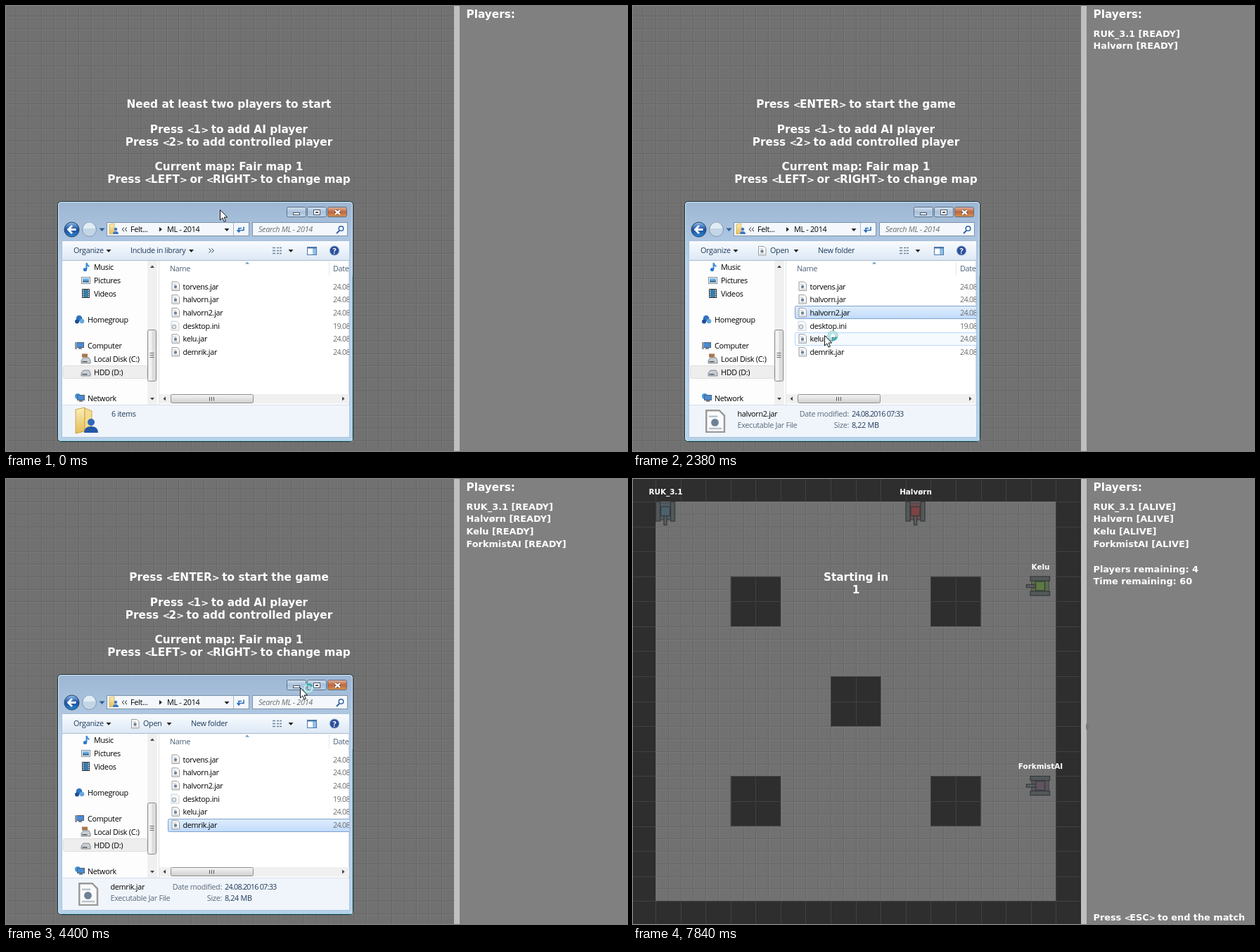
An HTML page for the animation above (8000 ms loop, 883 by 634 pixels).

```html
<!DOCTYPE html>
<html lang="en">
<head>
<meta charset="utf-8">
<title>Tank lobby</title>
<style>
html, body { margin: 0; width: 100%; height: 100%; overflow: hidden; background: #717171; }
svg { display: block; }
.game { font: bold 15.3px "DejaVu Sans", sans-serif; fill: #fff; }
.game .sub { font-size: 12.85px; }
.game .tag { font-size: 10.4px; text-anchor: middle; }
.game .key { font-size: .85em; letter-spacing: -.14em; }
.mid { text-anchor: middle; }
.ui { font: 10.8px "Open Sans", "Noto Sans", sans-serif; letter-spacing: -.3px; fill: #000; }
.ui .num { letter-spacing: -.75px; }
text { white-space: pre; }
</style>
</head>
<body>
<svg width="883" height="634" viewBox="0 0 883 634">
  <defs>
    <clipPath id="list"><path d="M218 363h270v205h-270z"/></clipPath>
    <clipPath id="nav"><path d="M80 363h137v205h-137z"/></clipPath>
  </defs>
  <g id="floor"></g>
  <g id="arena"></g>
  <path fill="#808080" d="M645 0h238v634h-238z"/>
  <path fill="#bfbfbf" d="M637 0h8v634h-8z"/>
  <ellipse id="smudge" cx="646" cy="353" rx="2" ry="5" fill="#777"/>
  <g id="hud" class="game"></g>
  <g id="win" class="ui"></g>
  <g id="cursor">
    <path fill="#fff" stroke="#111" stroke-width="1" d="M.5.5v14.5l3.3-3.2 2.3 5.4 2.3-1-2.3-5.2h4.6z"/>
    <g id="ring" fill="none">
      <circle r="5.5" stroke="#8fd0d2" stroke-width="4"/>
      <circle r="5.5" stroke="#d9f3f3" stroke-width="1.4"/>
      <path stroke="#3aa6a8" stroke-width="2.6" d="M0-5.5a5.5 5.5 0 0 1 5.5 5.5"/>
    </g>
  </g>
</svg>
<script>
const LOOP = 8000, TILE = 17.79, CELL = 2 * TILE, EDGE = 32, ROW = 18.7;
const $ = id => document.getElementById(id);

// ---------- data ----------
const bots = [
  { name: 'RUK_3.1', join: 1180, x: 46, y: 46, turn: 0, color: '#4b626c' },
  { name: 'Halvørn', join: 2010, x: 401.5, y: 46, turn: 0, color: '#7e4343' },
  { name: 'Kelu', join: 2850, x: 579, y: 152.5, turn: 90, color: '#5d7a42' },
  { name: 'ForkmistAI', join: 3640, x: 579, y: 437, turn: 90, color: '#5f5361' }
];
const files = ['torvens.jar', 'halvorn.jar', 'halvorn2.jar', 'desktop.ini', 'kelu.jar', 'demrik.jar'];
const sizes = ['8,22', '8,22', '8,22', '', '8,23', '8,24'];
const picks = [[950, 0], [1830, 2], [2620, 4], [3370, 5]];
// start, end, steps, x, y
const moves = [
  [220, 760, 12, 276, 394], [1320, 1590, 7, 275, 458], [1730, 1730, 1, 276, 443],
  [2190, 2380, 5, 272, 469], [2990, 3110, 3, 276, 531], [3150, 3230, 3, 280, 491],
  [3690, 4170, 11, 418, 297], [4690, 4820, 3, 647, 355], [5010, 5010, 1, 647, 352],
  [5210, 5210, 1, 777, 416]
];

// ---------- helpers ----------
const rect = (x, y, w, h, fill, more = '') =>
  `<rect x="${x}" y="${y}" width="${w}" height="${h}" fill="${fill}" ${more}/>`;
const path = (d, fill, more = '') => `<path d="${d}" fill="${fill}" ${more}/>`;
const dot = (x, y, r, fill, more = '') => `<circle cx="${x}" cy="${y}" r="${r}" fill="${fill}" ${more}/>`;
const text = (x, y, s, more = '') => `<text x="${x}" y="${y}" ${more}>${s}</text>`;
const line = (d, color, w = 1, more = '') => path(d, 'none', `stroke="${color}" stroke-width="${w}" ${more}`);
const frame = (x, y, w, h, fill, stroke, r = 0) =>
  rect(x + .5, y + .5, w - 1, h - 1, fill, `stroke="${stroke}" rx="${r}"`);
const down = (x, y, c = '#222', r = 3.5) => path(`M${x - r} ${y - 2}h${2 * r}l${-r} ${r + .5}z`, c);
const fade = (id, ...stops) => `<linearGradient id="${id}" x2="0" y2="1">` +
  stops.map((c, i) => `<stop offset="${i / (stops.length - 1)}" stop-color="${c}"/>`).join('') + '</linearGradient>';

// Key names sit in tight angle brackets.
const keys = s => s.replace(/[<>]/g, c => `<tspan class="key">${c === '<' ? '&lt;' : '&gt;'}</tspan>`);
const big = (y, s) => text(317, y, keys(s), 'class="mid"');
const side = (y, s) => text(654.5, y, keys(s), 'class="sub"');

const page = (x, y, k = 1) => `<g transform="translate(${x} ${y}) scale(${k})">` +
  path('M.5.5h7.5l3 3v9.5h-10.5z', '#fbfbfb', 'stroke="#9a9a9a"') +
  line('M2 4h5M2 11h7.5', '#b9c4cf') + dot(5.5, 7.5, 2.2, '#6d8196') + '</g>';

// ---------- arena ----------
// Whole-pixel grid lines in both directions, one tile or cell apart.
function mesh(first, step, shift) {
  let d = '';
  for (let p = first; p < 637; p += step) {
    const q = Math.round(p) + shift + .5;
    d += `M${q} 0v634M0 ${q}h637`;
  }
  return d;
}
$('floor').innerHTML = rect(0, 0, 637, 634, '#717171') +
  line(mesh(EDGE - TILE, TILE, 1), '#7a7a7a') + line(mesh(EDGE - TILE, TILE, 0), '#666');

function tank({ x, y, turn, color, name }) {
  const edge = 'stroke="#383b3d" stroke-width="1.3"';
  return `<g transform="translate(${x} ${y}) rotate(${turn})">` +
    rect(-8, -12, 16, 24, '#53585a', edge) + rect(-8, -12, 16, 24, color, 'opacity=".55"') +
    rect(-13.5, -13.5, 6, 27.5, '#53585a', edge) + rect(7.5, -13.5, 6, 27.5, '#53585a', edge) +
    rect(-6.5, -6.5, 13, 13, color, edge) + rect(-2, 6.5, 4, 13, '#5a5f60', edge) + '</g>' +
    text(x + .5, y - 24, name, 'class="tag"');
}
const blocks = [[3, 3], [11, 3], [7, 7], [3, 11], [11, 11]];
const far = EDGE + 16 * CELL;
$('arena').innerHTML =
  '<clipPath id="walls">' +
  path(`M0 0h637v634h-637zM${EDGE} ${EDGE}V${far}H${far}V${EDGE}z`, '#000', 'clip-rule="evenodd"') +
  blocks.map(([c, r]) => rect(EDGE + c * CELL, EDGE + r * CELL, 2 * CELL, 2 * CELL, '#000')).join('') +
  '</clipPath><g clip-path="url(#walls)">' + rect(0, 0, 637, 634, '#2e2e2e') +
  line(mesh(EDGE, CELL, 0), '#414141') + '</g>' +
  '<g class="game">' + bots.map(tank).join('') + '</g>';

// ---------- explorer window ----------
function chrome() {
  const button = (x, fill, id) => `<g id="${id}">` + frame(x, 286, 28, 15, fill, '#5b7188', 2) + '</g>';
  const refresh = 'M331 322v-5.5h4M328.5 319l2.5 3 2.5-3M338 314.500v5h-4M335.500 317';
  return '<defs>' + fade('glass', '#9db6d3', '#b7cfe8', '#b9d1ea', '#b9d1ea', '#b5d3ea') +
    fade('bar', '#f9fbfd', '#eaf2fa', '#dce7f5') + fade('btn', '#d3e0ee', '#a9c1da', '#bfd4e9') +
    fade('close', '#e3b29a', '#c0673f', '#d8924f') + fade('sel', '#dfedfd', '#c1dbfc') +
    fade('blue', '#8fc0ee', '#1a4fa0', '#2e86d0') + fade('thumb', '#f5f5f5', '#cfcfcf') +
    fade('folder', '#fbeeb6', '#e4bd58') + '</defs>' +
    rect(73.5, 278.5, 420, 342, 'url(#glass)', 'stroke="#16303a" rx="5"') +
    rect(74.5, 279.5, 418, 340, 'none', 'stroke="#dcecf8" rx="4"') +
    line('M76 619.500h416.500v-235', '#6fc3d0', 1, 'opacity=".7"') +
    button(399, 'url(#btn)', 'min') + button(428, 'url(#btn)', 'max') + button(457, 'url(#close)', 'quit') +
    frame(408, 294, 10, 4, '#fff', '#47566a') +
    frame(437, 290, 10, 8, '#fff', '#47566a') + rect(440, 293, 4, 2, '#47566a') +
    line('M468 291l7 6M475 291l-7 6', '#513530', 4) + line('M468 291l7 6M475 291l-7 6', '#fff', 2.4) +
    // navigation buttons
    dot(93.5, 318.5, 10.5, 'url(#blue)', 'stroke="#23405f"') +
    line('M99.500 318.500h-11M94 313l-5.500 5.500 5.500 5.500', '#fff', 2.8) +
    dot(118.5, 318.5, 10, '#c3d5e6', 'stroke="#7f97b0"') +
    path('M110 317a8.5 8.5 0 0 1 17 0z', '#e2ecf5') + down(136.5, 318.5, '#2b5f97', 4) +
    // address and search
    frame(143, 308, 203, 20, '#f4f8fc', '#7d93aa') + line('M323.5 309v18', '#a5b7c9') +
    `<g id="crumb">${frame(224, 309, 82, 18, 'url(#sel)', '#7fb0dc')}</g>` +
    path('M147 311l7-1v14l-7 1z', 'url(#folder)', 'stroke="#c39a3c" stroke-width=".6"') +
    dot(156, 318, 2.2, '#3b78c4') + path('M152 325a4 4 0 0 1 8 0z', '#3b78c4') +
    line('M168 315.5l-3 2.8 3 2.8M172 315.5l-3 2.8 3 2.8', '#222') +
    text(177, 322, 'Felt...') + path('M218 315l4 3.3-4 3.3z', '#222') + text(229, 322, 'ML - 2014') +
    down(314, 319) + line(refresh, '#2b6cb8', 1.6) +
    frame(350, 308, 136, 20, '#f4f8fc', '#7d93aa') +
    text(359, 322, 'Search ML - 2014', 'font-style="italic" fill="#6d6d6d"') +
    dot(476.5, 317, 3.3, 'none', 'stroke="#2f62a8" stroke-width="1.5"') + line('M474 320l-4 4', '#2f62a8', 2) +
    // toolbar
    rect(80, 335, 408, 279, '#fff', 'stroke="#a3b8cd"') + rect(80, 335, 408, 28, 'url(#bar)') +
    line('M80 362.5h408', '#a9bbcf') + '<g fill="#1e395b">' + text(96, 352, 'Organize') + down(146, 349) +
    '<g id="idle">' + text(177, 352, 'Include in library') + down(263.5, 349) +
    line('M288.5 345.5l3 3-3 3M292.5 345.5l3 3-3 3', '#1e395b') + '</g>' +
    '<g id="busy">' + page(178, 342) + text(195, 352, 'Open') + down(232, 349) + text(263, 352, 'New folder') + '</g></g>' +
    [344.5, 348.5, 352.5].map(y => line(`M379 ${y}h4M385 ${y}h3M389 ${y}h3`, '#6f8296', 1.6)).join('') +
    down(405, 349) + frame(428, 343, 14, 12, '#fff', '#4b78a8') + rect(436, 344, 5, 10, '#8fc0e6') +
    line('M428 344.5h14', '#4b78a8', 2) + dot(467, 348.5, 6.6, '#2a4f9c', 'stroke="#8ea6c6"') +
    text(467, 352.5, '?', 'class="mid" fill="#fff" font-weight="bold"');
}

function navPane() {
  const disk = (x, y) => path(`M${x} ${y + 4}l3-4h8l2 4v4h-13z`, '#c9ced3', 'stroke="#6d757c" stroke-width=".8"') +
    rect(x + 1.5, y + 5, 7, 1.5, '#555c63');
  const screen = (x, y) => frame(x, y, 11, 8, '#4a8bd6', '#54616f') + rect(x + 3, y + 8, 5, 2, '#7b8792');
  return '<g clip-path="url(#nav)">' + rect(80, 363, 137, 205, '#fdfdfe') +
    frame(81, 512, 120, 19, '#eeeeee', '#dedede', 2) +
    line('M114.5 375v-9q1 4 4 5', '#3a8bd8', 2) + dot(112.5, 375.5, 2.6, '#2e78c6') +
    frame(107, 386, 13, 10, '#fff', '#7e8a95') + rect(109, 388, 9, 3, '#6fb1e8') + rect(109, 391, 9, 3, '#4d7d9d') +
    frame(108, 403, 11, 13, '#3d7ba6', '#333') +
    line('M109.5 404v11M117.5 404v11', '#fff', 1, 'stroke-dasharray="1.5"') +
    dot(104, 445, 4.3, '#2f74c0') + dot(108, 449, 3.3, '#67a7dc') + dot(101, 449.5, 3, '#1f4e94') +
    screen(100, 479) + rect(98, 479, 3, 10, '#8b98a5') + rect(108, 495.5, 8, 5, '#a6774e') + disk(107, 501) + disk(107, 519) +
    dot(102, 556, 4, '#3f9be0') + screen(101, 554) +
    [['Music', 125, 376], ['Pictures', 125, 395], ['Videos', 125, 413.5], ['Homegroup', 116, 451], ['Computer', 116, 488],
     ['Local Disk (C:)', 125, 507], ['HDD (D:)', 125, 525.5], ['Network', 116, 563]]
      .map(([s, x, y]) => text(x, y, s)).join('') +
    rect(201, 363, 14, 205, '#f0f0f0') + path('M205 373l3-3.5 3 3.5z', '#444') + down(208, 560, '#444', 3) +
    frame(201, 461, 13, 74, '#dcdcdc', '#8d8d8d', 2) + rect(202.5, 462.5, 5, 71, '#f2f2f2') +
    line('M204.5 494.5h6M204.5 497.5h6M204.5 500.5h6', '#666') + '</g>' +
    line('M217.5 363v205', '#dfe5ec');
}

function fileList() {
  return '<g clip-path="url(#list)">' +
    text(233, 378, 'Name', 'fill="#4c607a"') + text(465, 378, 'Date', 'fill="#4c607a"') +
    path('M340 367.5l3-3 3 3z', '#5c9ac4') + line('M459.5 364v20', '#e0e8f0') +
    '<g id="rows"></g>' +
    files.map((f, i) => {
      const y = 399.5 + i * ROW;
      const icon = f.endsWith('ini')
        ? path(`M235 ${y - 6.5}h8l3 3v10h-11z`, '#f6f8fa', 'stroke="#c9d0d6"') + dot(239, y + 1.5, 2.6, 'none', 'stroke="#a7b4bf" stroke-width="1.6"')
        : page(235.5, y - 7);
      return icon + text(251.5, y + 4, f) +
        text(465, y + 4, (i === 3 ? '19' : '24') + '.08.2016 07:33', 'class="num" fill="#6d6d6d"');
    }).join('') +
    rect(218, 553, 270, 13.5, '#f0f0f0') + path('M227 556.5l-3.5 3 3.5 3z', '#444') + path('M478 556.5l3.5 3-3.5 3z', '#444') +
    frame(234, 553, 118, 13, 'url(#thumb)', '#8d8d8d', 2) +
    line('M289.5 557v5.5M292.5 557v5.5M295.5 557v5.5', '#555') + '</g>' +
    rect(80, 568, 408, 46, '#f0f5fb') + line('M80 568.5h408', '#d4dfec') + '<g id="details"></g>';
}
$('win').innerHTML = chrome() + navPane() + fileList();

const folderInfo =
  path('M99 575l13-3v34l-13 3z', 'url(#folder)', 'stroke="#cda64a"') +
  path('M112 573l10 4v30l-10-1z', '#f3dc91', 'stroke="#cda64a"') +
  dot(121, 593, 5, '#2e69bd') + path('M111 608q0-9 10-9t10 9z', '#2457a8') +
  text(150, 585, '6 items', 'fill="#1e395b"');
const fileInfo = i =>
  page(103, 575, 2.45) + text(148.5, 585, files[i]) +
  '<g fill="#5a6779">' + text(148.5, 601, 'Executable Jar File') +
  text(307, 585, 'Date modified:', 'text-anchor="end"') + text(307, 601, 'Size:', 'text-anchor="end"') + '</g>' +
  '<g fill="#1e395b">' + text(311, 585, '24.08.2016 07:33', 'class="num"') + text(311, 601, sizes[i] + ' MB') + '</g>';

// ---------- state by time ----------
function pointer(t) {
  let x = 304, y = 290;
  for (const [a, b, n, tx, ty] of moves) {
    if (t < a) break;
    const p = b > a ? Math.min(1, (Math.floor((t - a) / (b - a) * (n - 1) + 1e-6) + 1) / n) : 1;
    const e = p * p * (3 - 2 * p);
    x += (tx - x) * e;
    y += (ty - y) * e;
  }
  return [x, y];
}

function hud(t) {
  const play = t >= 5940;
  const joined = bots.filter(b => t >= b.join);
  let s = text(654.5, 17, 'Players:');
  joined.forEach((b, i) => s += side(43.5 + i * TILE, `${b.name} [${play ? 'ALIVE' : 'READY'}]`));
  if (play) {
    const count = t < 6820 ? 3 : t < 7840 ? 2 : 1;
    return s + side(132.5, 'Players remaining: 4') + side(150.3, 'Time remaining: 60') +
      side(628.5, 'Press <ESC> to end the match') + big(145, 'Starting in') + big(163, String(count));
  }
  return s + big(145, joined.length < 2 ? 'Need at least two players to start' : 'Press <ENTER> to start the game') +
    big(180.5, 'Press <1> to add AI player') + big(198.5, 'Press <2> to add controlled player') +
    big(234, 'Current map: Fair map 1') + big(251.5, 'Press <LEFT> or <RIGHT> to change map');
}

const last = {};
function put(id, html) {
  if (last[id] !== html) $(id).innerHTML = last[id] = html;
}
const show = (id, on) => $(id).setAttribute('visibility', on ? 'inherit' : 'hidden');

function draw(t) {
  const [x, y] = pointer(t);
  const pick = picks.filter(p => t >= p[0]).pop();
  const sel = pick ? pick[1] : -1;
  const over = x > 230 && x < 487 ? Math.floor((y - 390.2) / ROW) : -1;
  const row = (i, fill, edge) => frame(230, Math.round(390 + i * ROW), 262, 19, fill, edge, 2);

  show('arena', t >= 5940);
  show('smudge', t >= 5290);
  put('hud', hud(t));
  put('rows', (over >= 0 && over < files.length && over !== sel ? row(over, '#f5faff', '#b8d6fb') : '') +
    (sel >= 0 ? row(sel, 'url(#sel)', '#7da2ce') : ''));
  put('details', sel < 0 ? folderInfo : fileInfo(sel));
  show('idle', sel < 0);
  show('busy', sel >= 0);
  show('crumb', y > 308 && y < 328 && x > 144 && x < 345);
  $('min').setAttribute('opacity', t >= 4310 && t < 4400 ? .6 : 1);

  // Minimising: three short steps.
  const step = t < 4690 ? 0 : t < 4755 ? 1 : t < 4820 ? 2 : 3;
  const k = 1 - step * .06;
  show('win', step < 3);
  $('win').setAttribute('opacity', 1 - step * .36);
  $('win').setAttribute('transform', `translate(${284 * (1 - k)} ${621 * (1 - k)}) scale(${k})`);

  show('cursor', t < 5290);
  show('ring', t >= 950 && t < 5010);
  $('cursor').setAttribute('transform', `translate(${x} ${y})`);
  $('ring').setAttribute('transform', `translate(12 1) rotate(${(x + y) * 5 % 360})`);
}

const start = performance.now();
(function tick() {
  draw((performance.now() - start) % LOOP);
  requestAnimationFrame(tick);
})();
</script>
</body>
</html>
```
